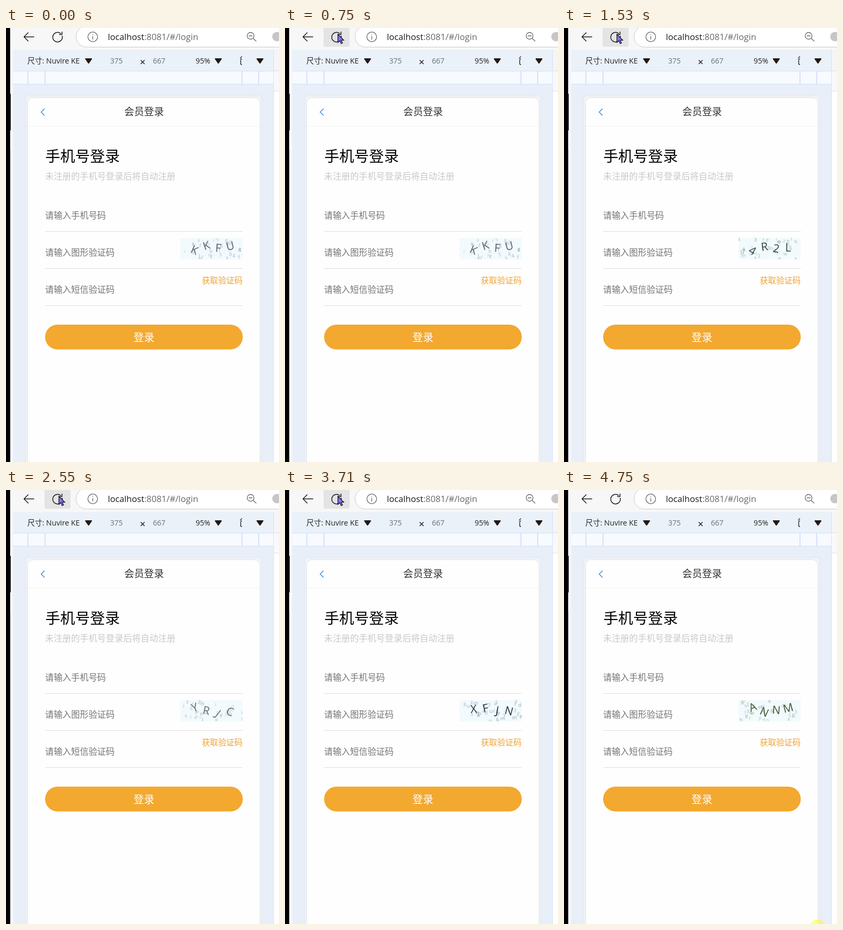
These frames come from a looping animation (524 by 831 pixels, 4820 ms). An HTML page:

```html
<!DOCTYPE html>
<html lang="zh-CN">
<head>
<meta charset="utf-8">
<title>会员登录</title>
<style>
html, body { margin: 0; width: 100%; height: 100%; overflow: hidden; background: #fff; }
svg { display: block; width: 524px; height: 831px; font-family: "Open Sans", "Noto Sans CJK SC", "Noto Sans CJK", sans-serif; }
.cjk { font-family: "Noto Sans CJK SC", "Noto Sans CJK", sans-serif; }
.icon { fill: none; stroke: #1b1b1b; stroke-width: 1.5; stroke-linecap: round; stroke-linejoin: round; }
.hint { font-size: 16.7px; fill: #757575; }
.bar { font-size: 14.3px; fill: #222; }
.size { font-size: 14px; fill: #6a7078; }
</style>
</head>
<body>
<svg viewBox="0 0 524 831" xmlns="http://www.w3.org/2000/svg">
  <defs>
    <clipPath id="codeBox"><rect x="335" y="402" width="119.5" height="41"/></clipPath>
    <filter id="soft"><feGaussianBlur stdDeviation="5"/></filter>
    <path id="drop" d="M1 0H12Q14 .5 12.700 2L7.500 9.500Q6.500 10.800 5.500 9.500L.3 2Q-1 .5 1 0Z" fill="#231815"/>
  </defs>

  <!-- browser bar -->
  <rect width="524" height="831" fill="#fff"/>
  <rect x="8" width="516" height="42" fill="#f7f7f7"/>
  <rect x="8" y="42" width="6" height="789" fill="#f5f7fc"/>
  <path d="M8.500 233V831" stroke="#d9d6dc"/>
  <rect width="8" height="831"/>
  <rect x="8" y="126" width="1" height="70"/>
  <rect id="hover" x="74" y="-8" width="50" height="44" rx="4" fill="#e4e4e4"/>
  <rect x="134.500" y="-3.500" width="430" height="40" rx="20" fill="#fff" stroke="#c9c9c9"/>
  <g class="icon">
    <path d="M53.500 17H35M42.500 9L34.500 17L42.500 25"/>
    <path d="M107.900 15.500A9.200 9.200 0 1 1 104.800 10.500M107.500 7.500V12.500H102.500"/>
    <g stroke="#666" stroke-width="1.300">
      <circle cx="166.500" cy="17" r="9.300"/>
      <path d="M166.500 16V21.500M166.500 12.700V12.900"/>
      <circle cx="469.500" cy="15" r="6.500"/>
      <path d="M474.500 20L480 25M466.500 15H472.500"/>
    </g>
  </g>
  <text x="195.500" y="23" font-size="16.700" fill="#666"><tspan fill="#1b1b1b">localhost</tspan>:8081/#/login</text>
  <circle cx="520" cy="16.500" r="9" fill="#c6c6c8"/>

  <!-- device toolbar and ruler -->
  <rect x="14" y="42" width="500" height="789" fill="#e9eff8"/>
  <rect x="14" y="42" width="500" height="40" fill="#eaf1f9"/>
  <rect x="14" y="82" width="500" height="26" fill="#f7faff"/>
  <path d="M14 82.500H514M14 107.500H514" stroke="#d3e1f5"/>
  <path d="M42 83V107M75 83V107M453 83V107M485 83V107" stroke="#c5dafa" stroke-width="1.500"/>
  <rect x="514" y="42" width="10" height="40" fill="#f5f5f6"/>
  <rect x="514" y="82" width="10" height="38" fill="#f9f9fc"/>
  <path d="M514 82H524" stroke="#dcdcdc"/>
  <path d="M514 120.500H524M513.500 42V831" stroke="#d5e3f8"/>
  <g class="bar">
    <text x="41" y="68">尺寸: Nuvire KE</text>
    <text class="size" x="200" y="68">375</text>
    <text class="size" x="282" y="68">667</text>
    <text x="364" y="68">95%</text>
  </g>
  <path d="M258.500 61.500L266 69M266 61.500L258.500 69" stroke="#222" stroke-width="1.500"/>
  <use href="#drop" x="152" y="58"/>
  <use href="#drop" x="401" y="58"/>
  <use href="#drop" x="481" y="58"/>
  <path d="M449.500 57.500L453 54.500M453 59.500H449.500M450.500 61V68.500Q450.500 70 453 70" fill="none" stroke="#222" stroke-width="1.400"/>

  <!-- phone page -->
  <rect x="39" y="131" width="450" height="740" fill="#dce1ea" opacity=".5" filter="url(#soft)"/>
  <rect x="39" y="131" width="450.500" height="720" rx="4" fill="#f3f4f6"/>
  <rect x="41.500" y="133.500" width="446" height="720" rx="10" fill="#fefefe" stroke="#dfe1e5"/>
  <path d="M42 188H487" stroke="#f1f1f1"/>
  <path d="M74 154.500L67.500 161L74 167.500" fill="none" stroke="#3d8be0" stroke-width="1.500"/>
  <g class="cjk">
    <text x="227" y="167" font-size="19" fill="#323233">会员登录</text>
    <text x="75.500" y="256" font-size="28.600">手机号登录</text>
    <text x="75" y="290" font-size="16.700" fill="#c8c8cb">未注册的手机号登录后将自动注册</text>
    <g id="fields"></g>
    <text x="376" y="489" font-size="15.600" fill="#eda331">获取验证码</text>
    <rect x="75" y="568" width="379.500" height="47.500" rx="23.750" fill="#f3a82f"/>
    <text x="264.800" y="600" font-size="20" fill="#fff" text-anchor="middle">登录</text>
  </g>
  <g id="codes" clip-path="url(#codeBox)"></g>

  <!-- pointer -->
  <g id="pointer">
    <g id="touch">
      <circle r="14" fill="#c2c2c2"/>
      <circle r="11" fill="#8f8f8f"/>
    </g>
    <path id="arrow" d="M.5 .5V16L4.200 12.800L6.800 18.500L9.400 17.300L6.900 11.800H11.800Z" fill="#8076f2" stroke="#16142c" stroke-width="1.300"/>
    <circle id="halo" r="15" fill="#ff0" opacity=".47"/>
  </g>
</svg>
<script>
const LOOP = 4820, STEP = 68, CLICK = 80;
const $ = id => document.getElementById(id);
const clamp = v => Math.min(1, Math.max(0, v));
const show = (node, on) => node.setAttribute('visibility', on ? 'visible' : 'hidden');

const hints = ['请输入手机号码', '请输入图形验证码', '请输入短信验证码'];
$('fields').innerHTML = hints.map((hint, i) => `<g transform="translate(75 ${365 + 71 * i})">
  <text class="hint">${hint}</text><path d="M0 24.5H379.5" stroke="#dedede"/></g>`).join('');

const codes = [
  { word: 'KKFU', from: 0, to: 1220, ink: '#5d6275', tilts: [24, -18, 4, -14] },
  { word: '4R2L', from: 1530, to: 2240, ink: '#2c4a40', tilts: [30, -8, 10, 0] },
  { word: 'YRJC', from: 2550, to: 2990, ink: '#667079', tilts: [-20, 10, 38, 20] },
  { word: 'XFJN', from: 3340, to: 3840, ink: '#22394b', tilts: [-5, -12, 10, 14] },
  { word: 'ANNM', from: 4430, to: LOOP, ink: '#3f5836', tilts: [-22, 25, 5, -14] }
];

function random(seed) {
  return () => (seed = seed * 16807 % 2147483647) / 2147483647;
}

function glyph(char, x, y, tilt, size, opacity = 1) {
  return `<text transform="translate(${x} ${y}) rotate(${tilt})" y="${size * .36}"
    font-size="${size}" opacity="${opacity}" text-anchor="middle">${char}</text>`;
}

function drawCode({ word, ink, tilts }, index) {
  const rnd = random(7919 * (index + 3));
  const letters = 'abcdefghikmnprstuwxyz2345678';
  let out = '';
  for (let i = 0; i < 32; i++) {
    const char = letters[Math.floor(rnd() * letters.length)];
    out += glyph(char, 336 + rnd() * 118, 403 + rnd() * 39, rnd() * 20 - 10, 9.5, .3 + rnd() * .2);
  }
  // Letters that lean right also sit lower
  tilts.forEach((tilt, i) => out += glyph(word[i], 362 + 22.7 * i, 420 + tilt / 5, tilt, 21.5));
  return `<g fill="${ink}"><rect x="335" y="402" width="119.5" height="41" fill="#f2fafd"/>${out}</g>`;
}

$('codes').innerHTML = codes.map(drawCode).join('');
const codeNodes = [...$('codes').children];

const strokes = [
  { from: 60, to: 470, x: [478, 210, 31], y: [813, 230, 4] },
  { from: 470, to: 750, x: [31, 115, 101], y: [4, 12, 11.5] },
  { from: 3840, to: 4100, x: [101, 200, 371], y: [11.5, 90, 336] },
  { from: 4100, to: 4560, x: [371, 570, 487], y: [336, 650, 837.5] }
];
const clicks = [900, 2040, 2810, 3590, 4750];

const curve = ([a, b, c], p) => a * (1 - p) ** 2 + 2 * b * p * (1 - p) + c * p * p;

function pointerAt(t) {
  const { from, to, x, y } = strokes.filter(s => s.from <= t).pop() || strokes[0];
  const steps = Math.round((to - from) / STEP);
  const p = Math.floor(clamp((t - from) / (to - from)) * steps + 1e-6) / steps;
  return [curve(x, p), curve(y, p)];
}

function render(t) {
  const [x, y] = pointerAt(t);
  const seen = t >= strokes[0].from;
  const onPage = x > 42 && x < 487 && y > 133;
  $('pointer').setAttribute('transform', `translate(${x} ${y})`);
  show($('touch'), seen && onPage);
  show($('arrow'), seen && !onPage);
  show($('halo'), clicks.some(c => t >= c && t < c + CLICK));
  $('hover').setAttribute('opacity', clamp((t - 470) / 280) * clamp((4140 - t) / 200));
  codes.forEach(({ from, to }, i) => show(codeNodes[i], t >= from && t < to));
}

const start = performance.now();
function tick() {
  render((performance.now() - start) % LOOP);
  requestAnimationFrame(tick);
}
tick();
</script>
</body>
</html>
```
